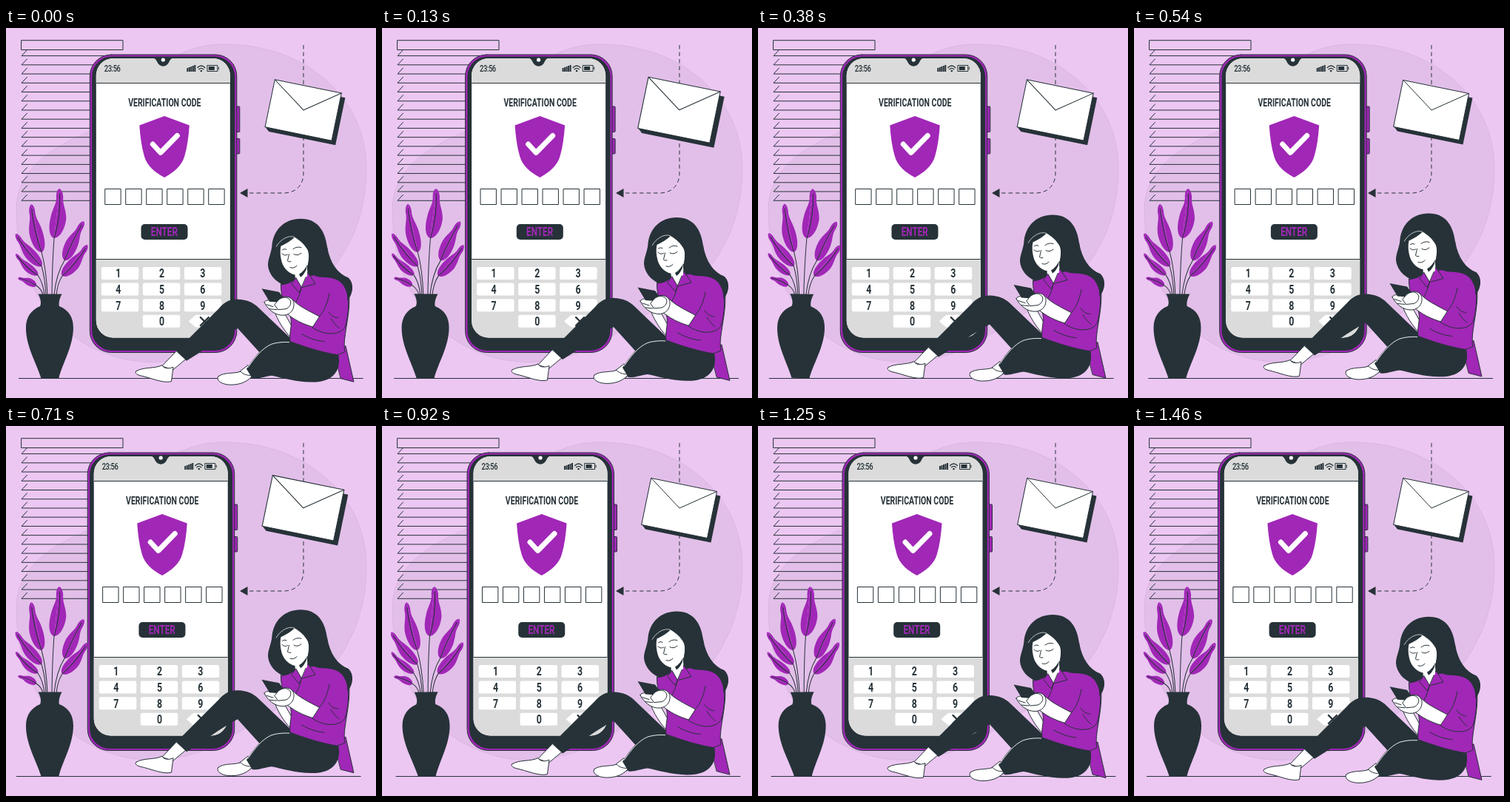
Animation of 500 by 500 pixels, one loop 1500 ms. Source, as an HTML page:

```html
<!DOCTYPE html>
<html lang="en">
<head>
<meta charset="utf-8">
<title>Verification code</title>
<style>
html, body { margin: 0; width: 100%; height: 100%; overflow: hidden; background: #ecc7f2; }
svg { display: block; width: 100vw; height: 100vh; }
text { font-family: Roboto, "Liberation Sans", sans-serif; font-weight: 700; fill: #263238; text-anchor: middle; }
.d { fill: #263238; }
.p { fill: #a127b7; }
.w { fill: #fff; }
.g { fill: #dbdbdb; }
.o { stroke: #263238; stroke-width: 1; stroke-linejoin: round; stroke-linecap: round; }
.l { fill: none; stroke: #263238; stroke-width: 1; stroke-linecap: round; stroke-linejoin: round; }
</style>
</head>
<body>
<svg viewBox="0 0 500 500" xmlns="http://www.w3.org/2000/svg">
  <defs>
    <clipPath id="glass"><rect x="122" y="41" width="181" height="377.500" rx="23"/></clipPath>
  </defs>
  <rect width="500" height="500" fill="#ecc7f2"/>
  <path fill="#e2bfe9" stroke="#d5b0dd" stroke-width=".7" d="M296 22C402 22 487 92 487 190C487 268 450 338 380 375C320 405 290 441 220 450C130 462 14 400 14 245C14 196 55 163 113 140C175 114 190 22 296 22Z"/>

  <g id="blinds" class="l"><rect x="21" y="16.700" width="137" height="12.800"/></g>

  <g id="phone">
    <path class="l" d="M17.500 473.500H482.500"/>
    <rect class="p o" x="309" y="106" width="7" height="34.500" rx="1"/>
    <rect class="p o" x="309" y="149.500" width="7" height="20.500" rx="1"/>
    <rect class="p o" x="113.500" y="36" width="198.500" height="402.500" rx="29"/>
    <rect class="d" x="116.300" y="38.500" width="193" height="397.500" rx="27"/>
    <g clip-path="url(#glass)">
      <rect class="w" x="120" y="40" width="186" height="380"/>
      <rect class="g" x="120" y="40" width="186" height="34.500"/>
      <rect class="g" x="120" y="312.500" width="186" height="108"/>
      <path class="l" d="M120 74.500H306M120 312.500H306"/>
      <path class="d" d="M195 40C202 40 203 43 204.500 46C208 53.500 217 53.500 220.500 46C222 43 223 40 230 40Z"/>
    </g>
    <circle class="w" cx="212.500" cy="43" r="2.600"/>
    <g id="bars" class="d"></g>
    <path class="l" style="stroke-width:1.300" d="M259 53.500Q264 48.500 269 53.500M261 55.800Q264 53 267 55.800"/>
    <circle class="d" cx="264" cy="58" r="1.300"/>
    <rect class="l" x="272.500" y="50.500" width="13.500" height="8"/>
    <rect class="d" x="274" y="52" width="8" height="5"/>
    <path class="l" d="M287.500 53V56"/>
    <path class="p" d="M214.300 119L248 131.500C247 147 245 161 241.500 173C238 186 227 195 214.300 202C201 195 190.500 186 187 173C183.500 161 181.500 147 180.500 131.500Z"/>
    <path fill="none" stroke="#fff" stroke-width="7" stroke-linecap="round" stroke-linejoin="round" d="M198.500 157L209 168.500L231.500 145.500"/>
    <rect class="d" x="182.700" y="265" width="63" height="21" rx="5"/>
    <g id="ui"></g>
    <path class="w" d="M247 396.300L255 389Q256.500 387.800 258.500 387.800H290Q292 387.800 292 390V402.500Q292 404.500 290 404.500H258.500Q256.500 404.500 255 403.300Z"/>
    <path class="l" style="stroke-width:2.400" d="M263 391L274 402M274 391L263 402"/>
  </g>

  <g id="plant">
    <g id="leaves"></g>
    <path class="d" d="M43.500 359.500H75.500C72 366 71 372 72 376C85 381 91 391 91 405C91 430 77 452 71.500 473H47.500C41 452 27 430 27 405C27 391 34 381 46 376C48 372 47 366 43.500 359.500Z"/>
  </g>

  <path class="l" stroke-dasharray="5.500 4" style="stroke-linecap:butt" d="M402 23V196C402 212 392 223 375 223H326"/>
  <path class="d" d="M316 223L326.500 217V229Z"/>

  <g id="mail">
    <path class="d" d="M369.500 76.500L457.500 94.500L444.500 157.500L356 139.500L351 133Z"/>
    <path class="w o" d="M364 70.500L452.500 88.500L439.500 151.500L351 133.500Z"/>
    <path class="l" d="M364 70.500L402 111L452.500 88.500"/>
  </g>

  <g id="woman">
    <!-- far leg -->
    <path class="w o" d="M211 457L232 435L244 447L226 462Z"/>
    <path class="w o" d="M176 464C186 458 201 461 211 456C213 461 221 461 226 458.500L223.500 478C212 481 196 473 181 470C175 468 174 466 176 464Z"/>
    <path class="d" d="M230 437L288 379C296 370 304 366.500 314 367C325 367.500 334 371 341 378L386 421L372 446L342 438L313 406C291 417 266 437 244 450Z"/>
    <!-- hair behind -->
    <path class="d" d="M398 258C421 258 431 274 434 296C437 320 448 332 461 337C471 343 470 359 461 369L425 360L376 348C364 343 355 333 354 321C354 311 359 304 359.500 293C362 272 377 258 398 258Z"/>
    <!-- tail of shirt -->
    <path class="p o" d="M443 436L459 430L470 478.500L452.500 474Z"/>
    <!-- near leg -->
    <path class="w o" d="M314 466L327 456L336 470L326 476Z"/>
    <path class="w o" d="M287 471C295 465 308 468 317 464.500C321 469 327 470 333 470C328 477 318 482.500 304 482.500C291 482.500 283 476 287 471Z"/>
    <path class="d" d="M325 461C335 446 345 432 359 427C380 422 400 424 425 433L449 441C453 459 446 474 425 478C400 481.500 375 473 359 470C347 471.500 341 475 333 474Z"/>
    <path fill="none" stroke="#fff" stroke-width=".9" d="M327 459C337 445 346 433 359 427.500C367 425 375 424.500 383 425"/>
    <!-- far arm -->
    <path class="w o" d="M362 381L373 380L386 403L384 418C376 409 367 396 362 381Z"/>
    <!-- shirt -->
    <path class="p o" d="M371.500 347C382 347 390 341 396 334L410 335C430 332 452 334 460 342C467 362 463 385 460 404C458 418 456 428 458 438L448 442C428 439 406 432 384 424C382 412 388 401 384 389C379 378 371 367 371.500 347Z"/>
    <path class="w" d="M390 326H407L408 336L399.500 351L391 340Z"/>
    <path class="p o" d="M392 338L399.500 351L396 358L386 346ZM408 331L418 346L407 349L399.500 351Z"/>
    <path class="l" d="M399 352C397 362 393 368 391 373M430 424C420 423 410 420 400 414"/>
    <!-- near arm -->
    <path class="w o" d="M387 367C395 376 408 382 425 391L417 405C402 401 388 394 378 385Z"/>
    <path class="p o" d="M437 359C434 374 429 384 425 388L414 405C430 416 450 416 458 405C463 390 464 370 461 352"/>
    <path class="l" d="M450 406C446 402 442 398 439 393M449 392C444 392 439 389 436 384"/>
    <!-- hands and handset -->
    <path class="w o" d="M349 371C351 367 357 368 362 369L374 364C382 362 388 366 389 372C390 381 384 388 375 388.500C364 389 354 381 349 371Z"/>
    <path class="d" d="M345.500 352.500L369 357L378 369L371 371L356 370Z"/>
    <path class="w o" d="M363 374L368 368C373 364 379 363 383 367C387 371 384 378 378 380L368 381Z"/>
    <path class="l" d="M352 374L361 377M356 380L366 381"/>
    <!-- face -->
    <path class="w" d="M371.500 295C378 292 385 288 390 283C397 287 404 293 408 301C410 308 410 316 407 322L407 336C402 338 398 335 396 333C389 336 379 330 374 320C370.500 311 370 302 371.500 295Z"/>
    <path class="d" d="M396 333C401 330 405 325 407 320L406 326C404 331 401 335 398 337Z"/>
    <path class="d" d="M400 288C411 296 410 308 408 320C409 331 416 337 428 337C440 337 452 340 457 350C460 356 462 361 461 368C469 360 470 346 463 338C448 332 438 318 434 296Z"/>
    <path class="l" d="M373 305Q376 309 380.500 306.500M389 306Q394 309 399 304.500M373.500 300Q376 298 379 299.500M388 299Q393 295 399 297M382.500 306L380.500 315Q382 317 385 316M384 324Q389 326 393 321.500"/>
    <path fill="none" stroke="#fff" stroke-width=".7" d="M390 283C384 280 372 284 365 296"/>
  </g>
</svg>
<script>
const $ = id => document.getElementById(id);
const add = (id, markup) => $(id).insertAdjacentHTML('beforeend', markup);
const NARROW = 0.735;

// Condensed lettering centred on x
const label = (x, y, str, size, style = '') =>
  `<text transform="translate(${x} ${y}) scale(${NARROW} 1)" font-size="${size}" style="${style}">${str}</text>`;

function drawBlinds() {
  let d = '';
  for (let i = 0; i < 17; i++) {
    const y = 37.6 + i * 12.23;
    d += `M158 ${y}H21L28.5 ${y - 8}`;
  }
  add('blinds', `<path d="${d}"/>`);
}

function drawScreen() {
  let s = label(143.8, 59, '23:56', 12.8, 'font-weight:500;letter-spacing:-.6px');
  s += label(214.5, 106, 'VERIFICATION CODE', 14.3);
  s += label(214, 281, 'ENTER', 16, 'fill:#a127b7');
  for (let i = 0; i < 6; i++) {
    s += `<rect class="w o" x="${134.3 + i * 28}" y="217.500" width="21" height="21"/>`;
  }
  [...'123456789 0'].forEach((n, i) => {
    if (n === ' ') return;
    const col = i % 3, y = 323 + Math.floor(i / 3) * 21.6;
    s += `<rect class="w" x="${129 + col * 56}" y="${y}" width="50.500" height="17" rx="2.500"/>`;
    s += label([152, 210.7, 266][col], y + 14.3, n, 16.8);
  });
  add('ui', s);
  for (let i = 0; i < 5; i++) {
    const h = 5 + i;
    add('bars', `<rect x="${244.5 + i * 2.5}" y="${59 - h}" width="2" height="${h}"/>`);
  }
}

// Leaf from base to tip, broad near the base, bent sideways by `bend`,
// with a stem that ends at the neck of the vase
function leaf(tx, ty, bx, by, w, bend, root) {
  const dx = tx - bx, dy = ty - by, len = Math.hypot(dx, dy);
  const nx = -dy / len, ny = dx / len;
  const at = (k, off) => {
    const side = off + bend * 4 * k * (1 - k);
    return `${bx + dx * k + nx * side} ${by + dy * k + ny * side}`;
  };
  const half = s =>
    `M${bx} ${by}C${at(.02, s * w * .7)} ${at(.2, s * w * 1.1)} ${at(.42, s * w)}` +
    `C${at(.62, s * w * .85)} ${at(.68, s * w * .35)} ${at(.85, s * w * .45)}` +
    `Q${at(.97, s * w * .4)} ${tx} ${ty}`;
  add('leaves',
    `<path class="p" d="${half(1)}"/><path class="p" d="${half(-1)}"/>` +
    `<path class="l" d="M${at(.9, 0)}Q${at(.45, bend)} ${bx} ${by}` +
    `Q${bx + (root - bx) * .8} ${by + (360 - by) * .4} ${root} 361"/>`);
}

function drawPlant() {
  leaf(72, 217, 65, 284, 10.5, 3, 62);
  leaf(34, 238, 48, 303, 9, -2, 56);
  leaf(105, 261, 79, 314, 8.5, -1, 65);
  leaf(110, 293, 76, 335, 8, 2, 68);
  leaf(13, 278, 48, 322, 7.5, -2, 54);
  leaf(13, 305, 43, 334, 5.5, -2, 52);
  leaf(16, 338, 41, 348, 5, 1, 50);
}

// Linear interpolation between keys
function track(p, keys) {
  const i = keys.findIndex(k => k[0] > p);
  const [a, u] = keys[i - 1], [b, v] = keys[i];
  return u + (v - u) * (p - a) / (b - a);
}

const LOOP = 1500, LEAD = 25;
const SHAKE = [0, -1, 2, -4, 4, -4, 4, -4, 2, -1, 0].map((v, i) => [i / 10, v]);
const BEAT = [[0, 1], [.1, 1.1], [.3, 1], [.4, 1], [.5, 1.1], [.6, 1], [1, 1]];
const SWAY = [[0, 0], [.25, 1], [.75, -1], [1, 0]];
const RISE = [[0, 0], [.5, -10], [1, 0]];

function render(time) {
  const p = ((time + LEAD) % LOOP) / LOOP;
  const move = (id, value) => $(id).setAttribute('transform', value);
  move('phone', `translate(${track(p, SHAKE)} 0)`);
  move('mail', `translate(404.5 113.5) scale(${track(p, BEAT)}) translate(-404.5 -113.5)`);
  move('plant', `rotate(${track(p, SWAY)} 61 345)`);
  move('woman', `translate(0 ${track(p, RISE)})`);
}

function frame(now) {
  render(now);
  requestAnimationFrame(frame);
}

drawBlinds();
drawScreen();
drawPlant();
render(0);
requestAnimationFrame(frame);
</script>
</body>
</html>
```
